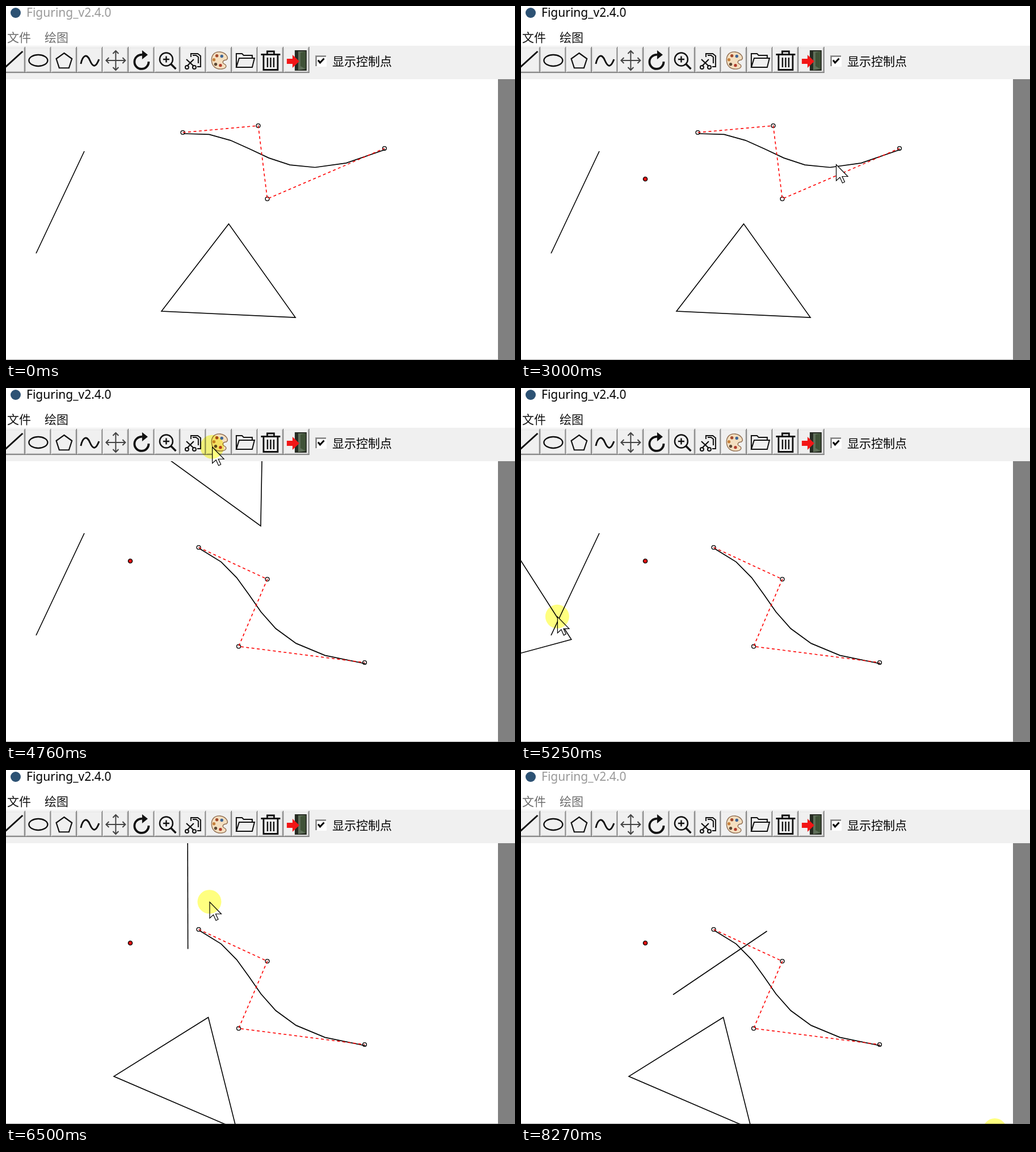
Recreate the animation shown at these times as an HTML page with a canvas. Size 897 px wide and 624 px high, loop 8.39 s.

```html
<!DOCTYPE html>
<html lang="zh">
<head>
<meta charset="utf-8">
<title>Drawing demo</title>
<style>
html, body { margin: 0; width: 100%; height: 100%; overflow: hidden; background: #fff; }
canvas { display: block; }
</style>
</head>
<body>
<canvas id="stage" width="897" height="624"></canvas>
<script>
const ctx = document.getElementById('stage').getContext('2d');
const LOOP = 8390, STEP = 125, LAST = 66;
const PIVOT = [219, 305];
const LATIN = '"Noto Sans", "Open Sans", sans-serif';
const HAN = '"Noto Sans CJK SC", "Noto Sans CJK", "Noto Sans CJK JP", sans-serif';

const easeOut = p => 1 - (1 - p) ** 3;
const smooth = p => p * p * (3 - 2 * p);
const sineOut = p => Math.sin(p * Math.PI / 2);
const speedUp = p => p ** 1.5;
const mix = (a, b, u) => a + (b - a) * u;

// Each shape is dragged about the pivot; grip is the pointer's path during the drag.
const curve = {
  start: 24.2, end: 30, turn: 30, ease: smooth, reach: 1,
  from: [[311.5, 223], [444.5, 211], [460.5, 340], [667, 251]],
  to: [[339.5, 281], [460.5, 337], [410, 455.5], [632, 484]],
  grip: [[555, 279], [522, 452]]
};
const triangle = {
  start: 33.8, end: 43.85, turn: -340, ease: speedUp, reach: .5,
  from: [[392.5, 384], [274, 538], [510, 549]],
  to: [[356.5, 436], [190, 540], [406, 633]],
  grip: [[495.5, 513], [300, 439]]
};
const line = {
  start: 45.35, end: 58, turn: 211, ease: sineOut, reach: 2,
  from: [[138, 256], [53, 436]],
  to: [[268, 396], [433.5, 284]],
  grip: [[112, 310], [395, 400]]
};

const move = (start, end, ...to) => ({ start, end, to });
const ENTRY = [652, 504];
const LEGS = [
  move(1, 5, 275, 106),
  move(9, 13, 241, 95),
  move(14, 17, ...PIVOT),
  move(18, 24, ...curve.grip[0]),
  curve,
  move(30, 33, ...triangle.grip[0]),
  triangle,
  move(44, 45, ...line.grip[0]),
  line,
  move(58, 63, 817, 614),
  move(63, 64, 835, 660),
  move(65, 66, 835, 635)
];
const TOOL_CLICK = 14, PIVOT_CLICK = 18, OUTSIDE_CLICK = LAST;

const progress = ({ start, end }, step) =>
  Math.max(0, Math.min(1, (step - start) / (end - start)));

function polar([x, y]) {
  const dx = x - PIVOT[0], dy = y - PIVOT[1];
  return [Math.hypot(dx, dy), Math.atan2(dy, dx)];
}

// Swings a point about the pivot by roughly `turn` degrees while its radius drifts.
function swing(from, to, turn, u, drift = .5) {
  const [r0, a0] = polar(from), [r1, a1] = polar(to);
  const angle = turn * Math.PI / 180, off = a1 - a0 - angle;
  const a = a0 + u * (angle + Math.atan2(Math.sin(off), Math.cos(off)));
  const r = mix(r0, r1, u ** drift);
  return [PIVOT[0] + r * Math.cos(a), PIVOT[1] + r * Math.sin(a)];
}

function posed(shape, step) {
  const u = shape.ease(progress(shape, step));
  return shape.from.map((point, i) => swing(point, shape.to[i], shape.turn, u));
}

function pointerAt(step) {
  let at = ENTRY;
  for (const leg of LEGS) {
    if (step < leg.start) break;
    const p = progress(leg, step);
    at = leg.grip
      ? swing(...leg.grip, leg.turn, leg.ease(p), leg.reach)
      : at.map((value, i) => mix(value, leg.to[i], easeOut(p)));
  }
  return at;
}

function isPressed(step) {
  return [TOOL_CLICK, PIVOT_CLICK, OUTSIDE_CLICK].includes(step) ||
    [curve, triangle, line].some(drag => step >= drag.start && step <= drag.end);
}

function bezier([a, b, c, d], t) {
  const s = 1 - t;
  return a.map((_, i) => s ** 3 * a[i] + 3 * s * s * t * b[i] + 3 * s * t * t * c[i] + t ** 3 * d[i]);
}

function rect(x, y, w, h, color) {
  ctx.fillStyle = color;
  ctx.fillRect(x, y, w, h);
}

function ink(path, width = 2, color = '#111') {
  ctx.strokeStyle = color;
  ctx.lineWidth = width;
  ctx.stroke(new Path2D(path));
}

function fill(path, color = '#111') {
  ctx.fillStyle = color;
  ctx.fill(new Path2D(path));
}

function disc(x, y, r, color, edge, width = 1.4) {
  ctx.beginPath();
  ctx.arc(x, y, r, 0, 7);
  if (color) { ctx.fillStyle = color; ctx.fill(); }
  if (edge) { ctx.strokeStyle = edge; ctx.lineWidth = width; ctx.stroke(); }
}

function polyline(points, { color = '#000', width = 1.6, closed = false, dash = [] } = {}) {
  ctx.beginPath();
  points.forEach(p => ctx.lineTo(...p));
  if (closed) ctx.closePath();
  ctx.setLineDash(dash);
  ctx.strokeStyle = color;
  ctx.lineWidth = width;
  ctx.stroke();
  ctx.setLineDash([]);
}

function label(text, x, y, family, color) {
  ctx.font = `21px ${family}`;
  ctx.fillStyle = color;
  ctx.fillText(text, x, y);
}

// Icons are drawn around the centre of their button.
const icons = [
  () => ink('M-16 15L18 -16', 3),
  () => { ctx.beginPath(); ctx.ellipse(0, 0, 16.5, 10, 0, 0, 7); ctx.lineWidth = 2.4; ctx.stroke(); },
  () => {
    const corner = i => {
      const a = (i * .4 - .5) * Math.PI;
      return [14.5 * Math.cos(a), 1.5 + 14.5 * Math.sin(a)];
    };
    polyline([0, 1, 2, 3, 4].map(corner), { color: '#111', width: 2.2, closed: true });
  },
  () => ink('M-16 6C-13 -8 -6 -14 0 0S11 11 16 -2', 3),
  () => {
    for (let i = 0; i < 4; i++) {
      ink('M0 1V-16M-5 -12L0 -17L5 -12', 2, '#444');
      ctx.rotate(Math.PI / 2);
    }
  },
  () => { ink('M12.500 2A12.500 12.500 0 1 1 1 -10', 3.8); fill('M1 -18L11 -10L1 -2Z'); },
  () => {
    disc(-2, -2, 11.5, null, '#111', 2.4);
    ink('M-7.500 -2H3.500M-2 -7.500V3.500', 2.4);
    ink('M6.500 6.500L15 15', 3.4);
  },
  () => {
    ink('M-4 -6V-12H8L13 -8V11H7M-1 -9H5L9 -6V5', 2);
    ink('M-12 -2L1 10M1 -2L-11 10', 2.2);
    [-11, 2].forEach(x => disc(x, 12, 3, null, '#111', 2));
  },
  () => {
    const blob = 'M2 -15C-9 -16 -14 -8 -13 1C-12 11 -5 16 5 15C13 14 15 9 9 6C4 3 8 -1 13 -1C18 -5 12 -14 2 -15Z';
    fill(blob, '#f4dfc0');
    ink(blob, 1.3, '#8b684b');
    ['#3e6697', '#a44b2d', '#c5803c', '#5c4936', '#b23d2d'].forEach((color, i) =>
      disc(9 * Math.cos(-1 - i), 9 * Math.sin(-1 - i), 2.7, color));
  },
  () => ink('M-15 12V-12H-5L-2 -9H13V-4M-15 12L-10 -4H17L13 12Z', 2),
  () => {
    ink('M-17 -10.500H17M-6 -12V-16H6V-12M-12.500 -9V16.500H12.500V-9', 2.8);
    [-5.5, 0, 5.5].forEach(x => ink(`M${x} -5V12`, 2.4));
  },
  () => {
    rect(-3, -18, 21, 36, '#262b22');
    fill('M3 -16H16V15L3 17Z', '#60705a');
    fill('M7 -14L16 -16V15L7 10Z', '#3f5237');
    fill('M-17 -3H-7V-10L5 1.500L-7 13V6H-17Z', '#f21616');
  }
];

function button(i) {
  const w = 45.5, x = (i - .25) * w;
  rect(x, 72, w, 46, '#696969');
  rect(x, 72, w - 1.3, 44.7, '#fff');
  rect(x + 1.4, 73.4, w - 2.7, 43.3, '#a0a0a0');
  rect(x + 1.4, 73.4, w - 4, 42, '#f0f0f0');
  ctx.save();
  ctx.translate(x + w / 2, 96);
  ctx.strokeStyle = '#111';
  icons[i]();
  ctx.restore();
}

function drawWindow(active) {
  rect(0, 0, 897, 624, '#fff');
  disc(17, 12, 9, '#2d5274');
  label('Figuring_v2.4.0', 36, 19, LATIN, active ? '#000' : '#999');
  const menu = active ? '#111' : '#6d6d6d';
  label('文件', 2, 63, HAN, menu);
  label('绘图', 68, 63, HAN, menu);
  rect(0, 70, 897, 59, '#f0f0f0');
  icons.forEach((_, i) => button(i));
  rect(545, 87, 19, 19, '#a0a0a0');
  rect(546.3, 88.3, 17.7, 17.7, '#696969');
  rect(547.6, 89.6, 17.4, 17.4, '#fff');
  ink('M550 95.500L553.500 100L560.500 92.500', 3, '#000');
  label('显示控制点', 575, 104.5, HAN, '#000');
  rect(867, 129, 30, 495, '#808080');
  rect(0, 623, 867, 1, '#a8a8a8');
}

function drawShapes(step) {
  ctx.save();
  ctx.beginPath();
  ctx.rect(0, 129, 867, 495);
  ctx.clip();
  polyline(posed(line, step));
  polyline(posed(triangle, step), { closed: true });

  const handles = posed(curve, step);
  const shifted = handles.map(([x, y]) => [x + 1.5, y + 2]);
  polyline(Array.from({ length: 9 }, (_, i) => bezier(shifted, i / 8)), { width: 1.7 });
  handles.forEach(p => disc(...p, 3.4, null, '#000'));
  polyline(handles, { color: '#f00', dash: [5, 4.5] });

  if (step >= PIVOT_CLICK) disc(...PIVOT, 3.6, '#e01010', '#000');
  ctx.restore();
}

function drawPointer(step) {
  if (step < 1) return;
  ctx.save();
  ctx.translate(...pointerAt(step));
  const arrow = 'M.5 .5V29L7 23L11.500 33L15.500 31L11 21.500H21Z';
  fill(arrow, '#fff');
  ink(arrow, 1.2, '#000');
  if (isPressed(step)) {
    ctx.globalCompositeOperation = 'multiply';
    disc(0, 0, 21, '#ffff80');
  }
  ctx.restore();
}

function draw(now) {
  const step = Math.min(LAST, Math.floor(now % LOOP / STEP));
  drawWindow(step >= TOOL_CLICK && step < OUTSIDE_CLICK);
  drawShapes(step);
  drawPointer(step);
}

let origin;
function tick(now) {
  origin ??= now;
  draw(now - origin);
  requestAnimationFrame(tick);
}
draw(0);
requestAnimationFrame(tick);
</script>
</body>
</html>
```
